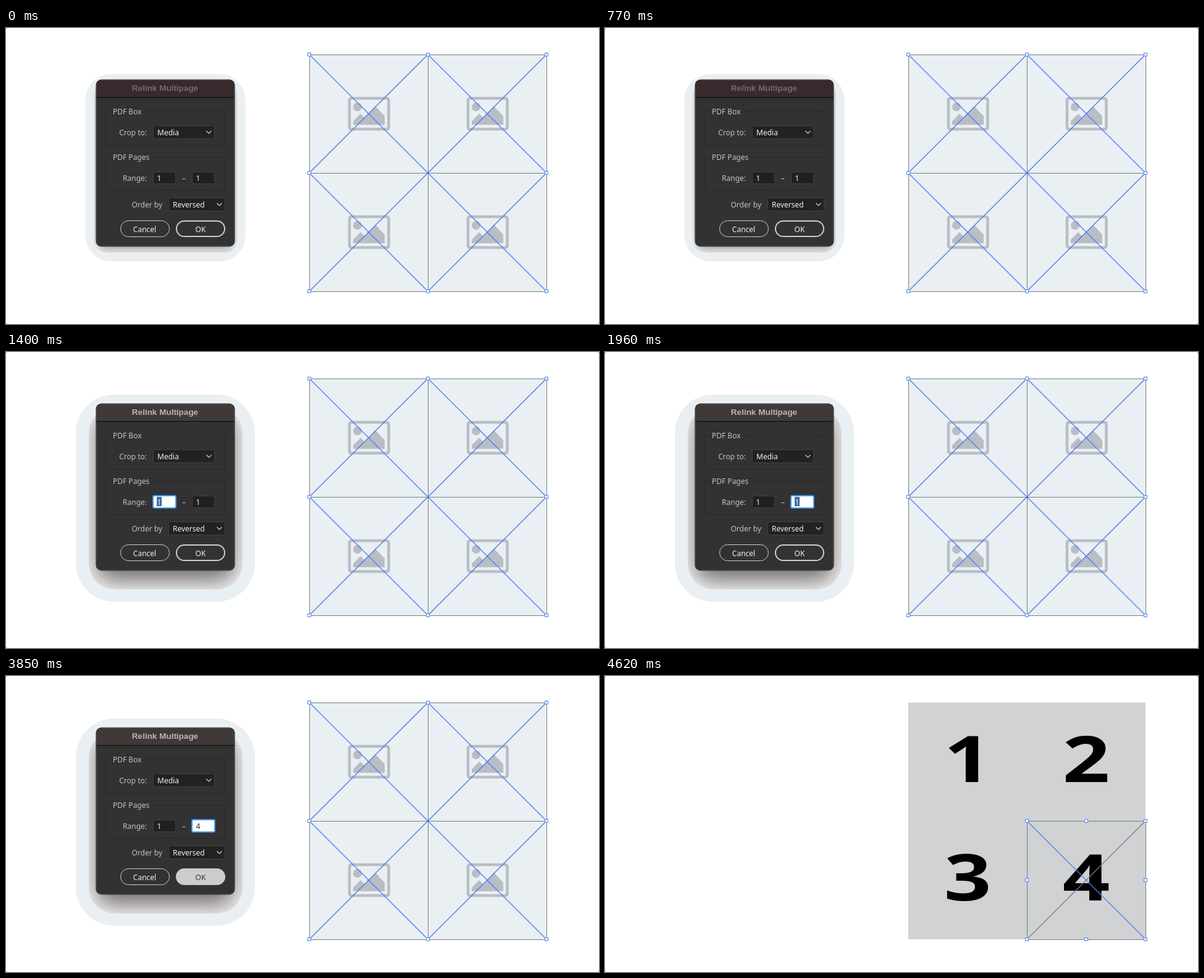
An HTML page with a canvas for the animation above (6230 ms loop, 960 px wide and 480 px high).

```html
<!DOCTYPE html>
<html lang="en">
<head>
<meta charset="utf-8">
<title>Relink Multipage</title>
<style>
  html, body { margin: 0; width: 100%; height: 100%; overflow: hidden; background: #fff; }
  canvas { display: block; }
</style>
</head>
<body>
<canvas id="stage" width="960" height="480"></canvas>
<script>
const ctx = document.getElementById('stage').getContext('2d');
const LOOP = 6230, STEP = 70;
const UI = '12px "Noto Sans", "Open Sans", sans-serif';
const UI_MEDIUM = '500 ' + UI;
const BLUE = '#4a7dff', PALE = '#e9eff2', EDGE = '#74817f';
const LEFT = 491, TOP = 43, CELL = 192;

// When each interaction happens, in ms
const ACTIVE = 840, TAB = 1470, TYPED = 2030, CARET_OFF = 2660,
      HOVER = 2380, PRESS = 4550, RELINKED = 4620;

function box(x, y, w, h, r, fill, stroke, lineWidth = 1) {
  ctx.beginPath();
  ctx.roundRect(x, y, w, h, r);
  if (fill) { ctx.fillStyle = fill; ctx.fill(); }
  if (stroke) { ctx.strokeStyle = stroke; ctx.lineWidth = lineWidth; ctx.stroke(); }
}

function polyline(points, color, width = 1) {
  ctx.beginPath();
  points.forEach(([x, y]) => ctx.lineTo(x, y));
  ctx.strokeStyle = color;
  ctx.lineWidth = width;
  ctx.stroke();
}

function text(string, x, y, color, font = UI, align = 'left') {
  ctx.font = font;
  ctx.textAlign = align;
  ctx.fillStyle = color;
  ctx.fillText(string, x, y);
}

const mix = (a, b, p) => `rgb(${a.map((v, i) => Math.round(v + (b[i] - v) * p)).join()})`;

function handle(x, y) {
  box(x - 2.5, y - 2.5, 5, 5, 0, '#fff', BLUE);
}

// Eight handles around a square selection
function handles(x, y, size) {
  for (let row = 0; row < 3; row++)
    for (let col = 0; col < 3; col++)
      if (row !== 1 || col !== 1) handle(x + col * size / 2, y + row * size / 2);
}

function frame(x, y, risingColor) {
  const l = x + .5, t = y + .5, r = l + CELL, b = t + CELL;
  polyline([[x, y + CELL], [x + CELL, y]], risingColor, 1.2);
  polyline([[l, t], [r, b]], BLUE, 1.2);
  polyline([[l, t], [r, t], [r, b], [l, b], [l, t]], EDGE);
}

function placeholder(x, y) {
  const gray = '#b9bdc4';
  ctx.save();
  ctx.translate(x, y);
  box(65, 71, 63.5, 50, 3, null, gray, 4.5);
  ctx.fillStyle = gray;
  ctx.beginPath();
  ctx.arc(78, 85, 7, 0, Math.PI * 2);
  ctx.fill();
  ctx.beginPath();
  [[71, 114], [71, 108], [83, 96], [90, 103], [107, 84], [122, 100], [122, 114]]
    .forEach(([px, py]) => ctx.lineTo(px, py));
  ctx.fill();
  ctx.restore();
}

function eachCell(draw) {
  for (let i = 0; i < 4; i++) draw(LEFT + i % 2 * CELL, TOP + (i >> 1) * CELL, i);
}

function emptyFrames() {
  box(LEFT, TOP, 2 * CELL, 2 * CELL, 0, PALE);
  eachCell(placeholder);
  eachCell((x, y) => frame(x, y, '#4d76dc'));
  handles(LEFT, TOP, 2 * CELL);
  box(LEFT + CELL - 1, TOP + CELL - 1, 3, 3, 0, BLUE);
}

function linkedPages() {
  box(LEFT, TOP, 2 * CELL, 2 * CELL, 0, '#d1d2d4');
  eachCell((x, y, i) => {
    // The placed pages are wider than tall
    ctx.save();
    ctx.translate(x + 96, y + 129);
    ctx.scale(1.29, 1);
    text(i + 1, 0, 0, '#000', '600 104px "Noto Sans", "Open Sans", sans-serif', 'center');
    ctx.restore();
  });
  frame(LEFT + CELL, TOP + CELL, '#747b80');
  handles(LEFT + CELL, TOP + CELL, CELL);
}

function shadow(active) {
  if (active) box(113, 69, 290, 336, 62, PALE);
  else box(128.5, 74.5, 259, 304, 42, PALE);
  ctx.save();
  ctx.beginPath();
  if (active) ctx.roundRect(134, 90, 249, 295, 42);
  else ctx.roundRect(142, 88, 232, 276, 20);
  ctx.clip();
  ctx.fillStyle = '#fff';
  ctx.fill();
  ctx.shadowColor = `rgba(20, 10, 10, ${active ? .62 : .4})`;
  ctx.shadowBlur = active ? 40 : 20;
  ctx.shadowOffsetY = active ? 18 : 7;
  box(146, 84, 224, 270, 9, '#000');
  ctx.restore();
}

function group(label, y, height, gapEnd) {
  polyline([[169, y], [161.5, y], [161.5, y + height], [354.5, y + height],
            [354.5, y], [gapEnd, y]], '#282828');
  text(label, 173, y + 4.5, '#c2c2c2');
}

function dropdown(label, x, y, width) {
  box(x + .5, y + .5, width - 1, 21, 2, '#222', '#404040');
  text(label, x + 7, y + 16, '#f0f0f0', UI_MEDIUM);
  const cx = x + width - 9.5;
  polyline([[cx - 4, y + 9], [cx, y + 13], [cx + 4, y + 9]], '#d0d0d0', 1.2);
}

function field(value, x, { focused, selected, caret }) {
  if (focused) box(x, 233, 37, 20, 2, '#fff', '#3d98f6', 2);
  else box(x + .5, 233.5, 36, 19, 2, '#202020', '#424242');
  if (selected) box(x + 6, 235, 8, 15, 0, '#3f6ba3');
  text(value, x + 6.5, 248, focused && !selected ? '#2a2a2a' : '#eee', UI_MEDIUM);
  if (caret) box(x + 13, 235, 1, 15, 0, '#222');
}

function okButton(t) {
  let label = '#fff';
  if (t >= PRESS) {
    box(275, 312, 80, 27, 13.5, '#459ff8');
  } else {
    const p = Math.min(1, Math.max(0, Math.floor((t - HOVER) / STEP) / 4));
    box(276, 313, 78, 25, 12.5, mix([50, 50, 50], [205, 205, 205], p), '#cdcdcd', 2);
    label = mix([240, 240, 240], [55, 55, 55], p);
  }
  text('OK', 315, 331, label, UI_MEDIUM, 'center');
}

function caretVisible(t) {
  return t >= TYPED && t < CARET_OFF || t >= 3220 && t < 3850 || t >= 4410;
}

function dialog(t) {
  const active = t >= ACTIVE;
  shadow(active);

  box(145.5, 83.5, 225, 271, 9, '#0a0a0a');
  box(146.5, 84.5, 223, 269, 8, '#323232', '#484646');
  box(147, 85, 222, 27, [7, 7, 0, 0], active ? '#3f3938' : '#37292c');
  box(146, 112, 224, 1, 0, '#080808');
  text('Relink Multipage', 257.5, 102, active ? '#b9b5b4' : '#74696b',
       'bold 13.5px "Liberation Sans", Arial, sans-serif', 'center');

  group('PDF Box', 135.5, 55, 224);
  text('Crop to:', 228, 174, '#c2c2c2', UI, 'right');
  dropdown('Media', 238, 158, 100);

  group('PDF Pages', 209.5, 54, 236);
  text('Range:', 228, 248, '#c2c2c2', UI, 'right');
  const first = active && t < TAB;
  const last = t >= TAB && t < PRESS;
  field('1', 238, { focused: first, selected: first });
  text('–', 288, 248, '#c2c2c2', UI, 'center');
  field(t < TYPED ? '1' : '4', 301, {
    focused: last,
    selected: last && t < TYPED,
    caret: last && caretVisible(t)
  });

  text('Order by', 253, 291, '#c2c2c2', UI, 'right');
  dropdown('Reversed', 263, 275, 92);

  box(185.5, 312.5, 79, 26, 13, null, '#cdcdcd');
  text('Cancel', 224.5, 331, '#f0f0f0', UI_MEDIUM, 'center');
  okButton(t);
}

function draw(now) {
  const t = now % LOOP;
  box(0, 0, 960, 480, 0, '#777');
  box(0, 0, 960, 480, 2.5, '#fff');
  if (t < RELINKED) {
    emptyFrames();
    dialog(t);
  } else {
    linkedPages();
  }
}

let start;
function tick(now) {
  start ??= now;
  draw(now - start);
  requestAnimationFrame(tick);
}
requestAnimationFrame(tick);
</script>
</body>
</html>
```
